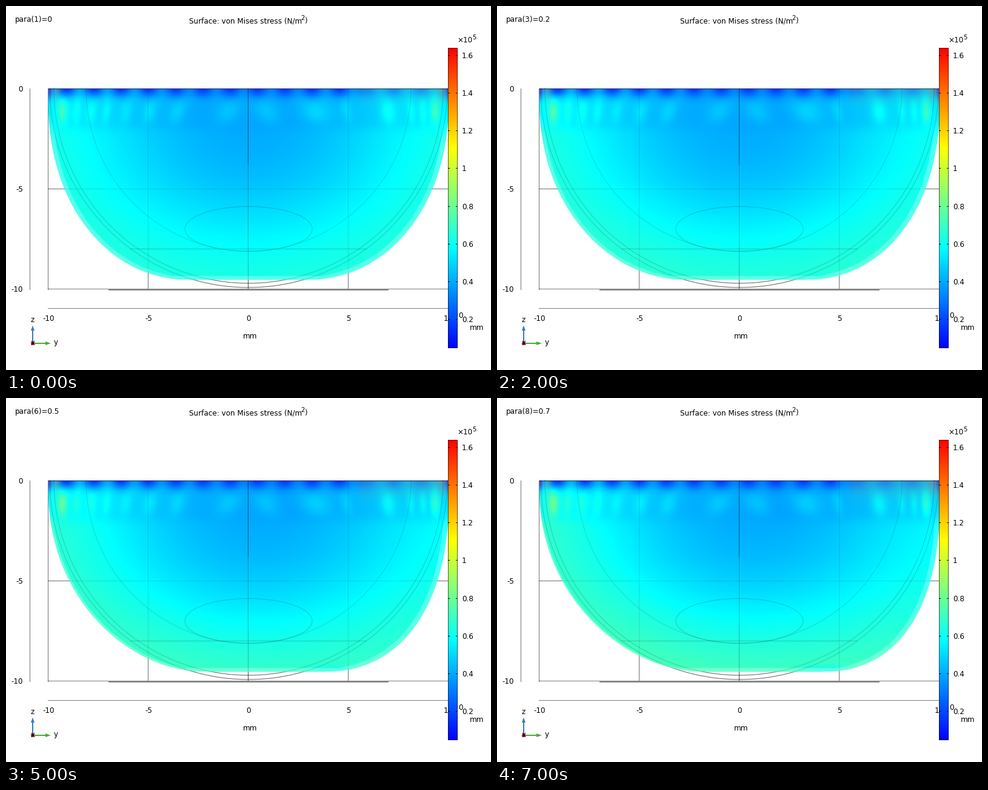
Write a matplotlib script that moves like this. It is 800 by 600 pixels and loops after 8 s.

```python
import numpy as np
import matplotlib.pyplot as plt
from matplotlib.animation import FuncAnimation
from matplotlib.patches import Circle, Ellipse, Polygon, Rectangle

W, H = 800, 600
STEPS = 8
PX = 0.72              # points per pixel at 100 dpi
CX, TOP, DEPTH = 400, 136, 315.5

plt.rcParams["font.family"] = "DejaVu Sans"
plt.rcParams["path.snap"] = False
fig = plt.figure(figsize=(8, 6), dpi=100, facecolor="white")
ax = fig.add_axes([0, 0, 1, 1])
ax.axis("off")

x, y = np.meshgrid(np.arange(W) + 0.5, np.arange(H) + 0.5)
dy = y - TOP
X, D = (x - CX) / 330, dy / DEPTH
reach = np.clip((x - 572) / 20, 0, 1)      # disturbed zone on the right


def rainbow(v):
    stops = [0, 1 / 3, 2 / 3, 1]
    rgb = [(0, 0, 1, 1), (0, 1, 1, 0), (1, 1, 0, 0)]
    return np.stack([np.interp(v, stops, c) for c in rgb], axis=-1)


def bell(a, width):
    return np.exp(-(a / width) ** 2)


def mix(col, other, amount):
    amount = amount[..., None]
    return col * (1 - amount) + np.array(other) / 255 * amount


# bright spots of the band under the upper face: x, width, strength
SPOTS = [(93, 8, .10), (117, 6, .04), (141, 8, .04), (166, 7, .04),
         (198, 9, .03), (237, 11, .04), (283, 13, .04), (366, 20, .04),
         (430, 20, .04), (510, 24, .05), (562, 9, .03), (630, 12, .065),
         (668, 6, .04), (688, 6, .04), (708, 7, .10)]


def stress(k):
    s = 1.15 * (0.175 * X ** 2 + 0.3 * (D - 0.2) ** 2)
    v = 0.225 + 0.162 * np.tanh(s / 0.162)
    v = v + k * (-0.04 * X * (1 - 0.5 * D) + 0.05 * D ** 2)
    v -= 0.05 * k * bell(x - 540, 38) * bell(y - 446, 6)

    band = 1 / (1 + np.exp(np.clip((dy - 66) / 5, -50, 50)))
    v -= 0.03 * band * np.abs(X) + 0.01 * band
    tilt = 0.35 * np.sign(X) * (1 - np.abs(X))
    for sx, width, amp in SPOTS:
        lean = x - sx - tilt * (dy - 38)
        gain = 1 + 0.25 * k if sx < 100 else 1
        v += amp * gain * bell(lean, width) * bell(dy - 38, 22) * band

    wave = 0.72 + 0.28 * np.cos((x - 325) / 45 * 2 * np.pi)
    wave *= 1 - 0.5 * reach
    v -= (v - 0.08) * bell(dy, 14) * wave
    return v


def edges(k):
    t = np.clip(D[:, 0], 0, 1)
    half = 95 + 235 * (1 - t ** 2.15) ** 0.465 + 3 * np.sin(np.pi * t)
    shift = 11 * k * (dy[:, 0] / 164) ** 2
    return CX + shift - half, CX + shift + half


def surface(k):
    left, right = edges(k)
    dl = (x - left[:, None]) / np.hypot(1, np.gradient(left))[:, None]
    dr = (right[:, None] - x) / np.hypot(1, np.gradient(right))[:, None]
    side, floor = np.minimum(dl, dr), 451.5 - y
    dist = np.minimum(side, floor)
    alpha = np.clip(dist + 0.5, 0, 1) * (dy > 0) * (x < 729)

    col = rainbow(np.clip(stress(k), 0, 1))

    # interference streaks in the two upper corners
    ripple = 0.5 + 0.5 * np.sin(1.9 * x + 0.02 * (x - 640) * dy)
    streak = 0.5 + 0.5 * np.sin(2.1 * x + 0.6 * y)
    grow = 0.25 + 0.25 * k + 0.25 * np.clip((x - 660) / 68, 0, 1)
    col = mix(col, (125, 145, 140), reach * grow * bell(dy, 22 + 6 * k) * ripple)
    col = mix(col, (235, 130, 50), 0.5 * bell(x - 84, 5) * bell(dy, 20) * streak)
    col = mix(col, (235, 130, 50), 0.4 * bell(x - 718, 6) * bell(dy, 20) * streak)
    col = mix(col, (80, 60, 220), 0.8 * bell(x - 72, 4) * bell(dy, 16))
    col = mix(col, (80, 60, 220), 0.6 * bell(x - 728, 4) * bell(dy, 16))

    # pale rim of the outer shell
    wide = np.where(x < CX, 7 * (1 - 0.65 * k), 8)
    rim = np.maximum(np.clip(wide - side + 0.5, 0, 1),
                     np.clip(7 - floor, 0, 1))
    col = mix(col, (255, 255, 255), 0.27 * rim * np.clip((dy - 40) / 60, 0, 1))
    return np.clip(np.dstack([col, alpha]), 0, 1)


def line(x0, y0, x1, y1, alpha, z=1, lw=1, color="black"):
    ax.plot([x0, x1], [y0, y1], color=color, alpha=alpha, lw=lw * PX,
            zorder=z, solid_capstyle="butt", snap=False)


def bowl(r, alpha, z):
    a = np.linspace(0, np.pi, 200)
    ax.plot(CX + r * np.cos(a), TOP + r * np.sin(a), color="black",
            alpha=alpha, lw=PX, zorder=z)


def label(tx, base, s, ha="left", size=12, z=8):
    return ax.text(tx, base, s, ha=ha, va="baseline",
                   fontsize=size * PX, color="black", zorder=z)


# grid: drawn behind the body, and again faintly over it
for z, a in ((1, 0.5), (3, 0.12)):
    line(69, 301.5, 729, 301.5, a, z)
    for gx in (234.5, 564.5):
        line(gx, 136, gx, 466, a, z)
line(39.5, 136, 39.5, 468, 0.55)
line(69.5, 136, 69.5, 468, 0.55)
line(69, 466.5, 729, 466.5, 0.5)
line(69, 498.5, 729, 498.5, 0.5)
line(169, 468, 631, 468, 0.6, lw=1.5)

# outlines of the undeformed geometry
for r in (328, 321):
    bowl(r, 0.5, 1)
    bowl(r, 0.18, 3)
bowl(268, 0.13, 3)
ax.add_patch(Ellipse((CX, 367.5), 210, 74, fill=False, ec="black",
                     alpha=0.18, lw=PX, zorder=3))
line(205, 400.5, 595, 400.5, 0.2, 3)
line(70, 136.5, 729, 136.5, 0.7, 4)
line(399.5, 136, 399.5, 262, 0.5, 3)
line(399.5, 262, 399.5, 451, 0.25, 3)
line(399.5, 451, 399.5, 466, 0.7, 1)

body = ax.imshow(surface(0), extent=(0, W, H, 0), aspect="auto",
                 interpolation="nearest", zorder=2)

# colour legend
ramp = rainbow(np.linspace(1, 0, 495))[:, None, :]
ax.imshow(ramp, extent=(729, 745, 564, 69), aspect="auto",
          interpolation="nearest", zorder=6)
ax.add_patch(Rectangle((729.5, 69.5), 15, 494, fill=False, ec="black",
                       alpha=0.6, lw=PX, zorder=7, snap=False))
for i, s in enumerate(("1.6", "1.4", "1.2", "1", "0.8", "0.6", "0.4", "0.2")):
    ty = round(81 + 62.15 * i) + 0.5
    line(729, ty, 732, ty, 1, 7)
    line(742, ty, 745, ty, 1, 7)
    label(752, ty + 4.5, s)
label(744, 60, "×10")
label(769, 55, "5", size=10)

# captions and axis labels
para = label(15, 26, "")
label(302, 28, "Surface: von Mises stress (N/m")
label(486, 23, "2", size=10)
label(492, 28, ")")
for base, s in ((141, "0"), (306, "-5"), (471, "-10")):
    label(28, base, s, "right")
for tx, s in ((70, "-10"), (235, "-5"), (400, "0"), (565, "5")):
    label(tx, 519, s, "center")
label(721.5, 519, "1", z=5)
label(746, 514, "0")
label(403, 548, "mm", "center")
label(777, 534, "mm", "center")

# axis triad
BLUE, GREEN = "#3a7cb8", "#4fa83d"
line(44, 556, 44, 533, 1, 4, 2, color=BLUE)
line(44, 556, 67, 556, 1, 4, 2, color=GREEN)
ax.add_patch(Polygon([(44, 526.5), (41, 535), (47, 535)], color=BLUE, lw=0, zorder=4))
ax.add_patch(Polygon([(74, 556), (65, 553), (65, 559)], color=GREEN, lw=0, zorder=4))
ax.add_patch(Circle((44, 556), 3, color="#c01040", lw=0, zorder=5))
label(44, 559, "x", "center")
label(44, 521, "z", "center")
label(82.5, 558, "y", "center")

ax.set_xlim(0, W)
ax.set_ylim(H, 0)


def update(i):
    body.set_data(surface(i / (STEPS - 1)))
    para.set_text(f"para({i + 1})={i / 10:g}")
    return body, para


anim = FuncAnimation(fig, update, frames=STEPS, interval=1000,
                     repeat=True, repeat_delay=0, blit=False)
plt.show()
```
